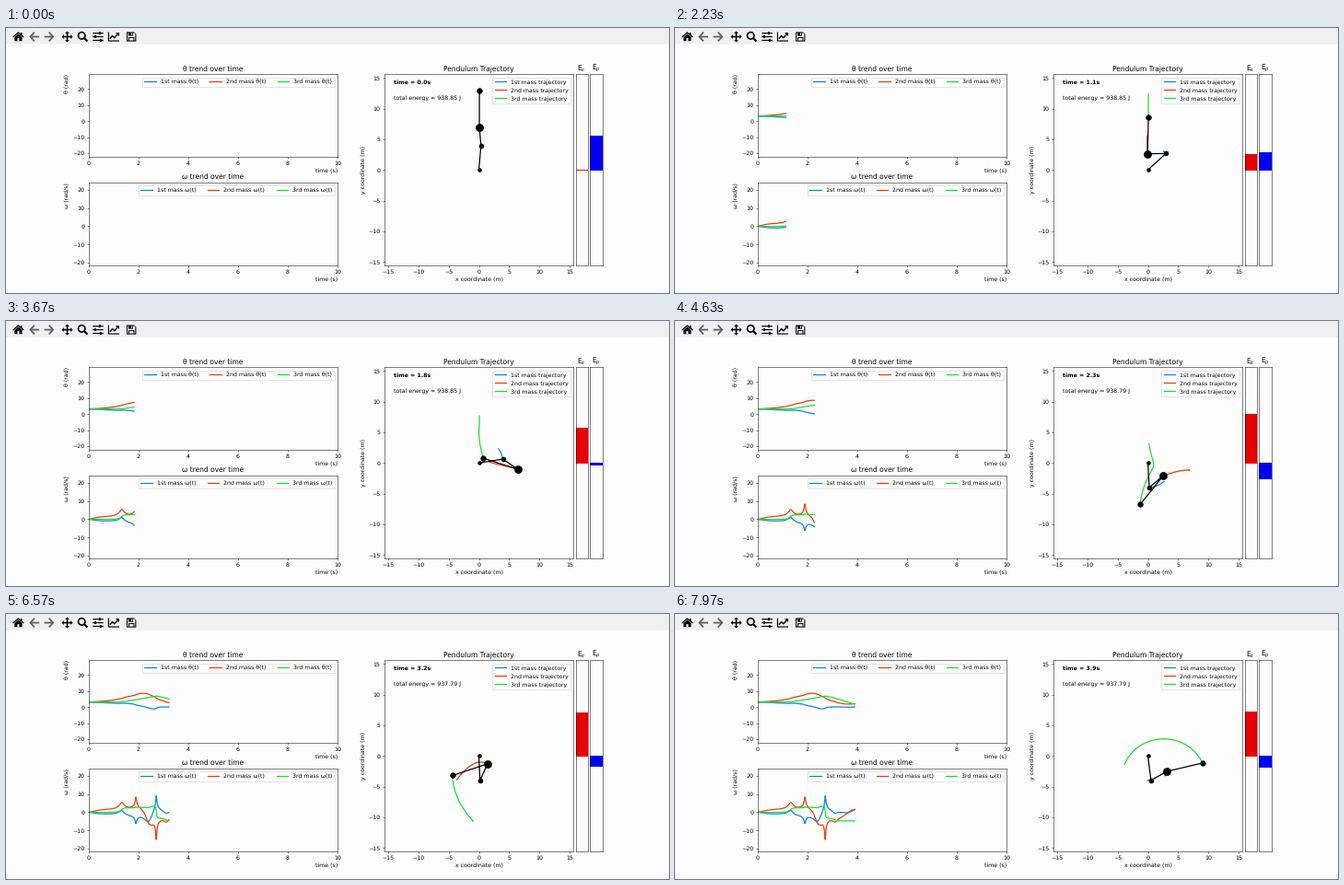
Recreate the animation shown at these times as a matplotlib script. Size 720 px wide and 288 px high, loop 8 s.

```python
import numpy as np
import matplotlib.pyplot as plt
from matplotlib.animation import FuncAnimation
from matplotlib.patches import Circle, Polygon, Rectangle

W, H, DPI = 720, 288, 45
FRAMES, LOOP = 240, 8000
DT, STEPS = 0.01, 400
LEAD, PACE = 5.4, 1.609          # simulation steps: head start, steps per frame
TRAILS = [20, 40, 60]
G = 9.81
MASS = np.array([2.0, 7.0, 3.0])
LEN = np.array([4.0, 3.0, 6.0])
START = np.radians([175, 185, 180])
COLORS = ["#0a84e8", "#f03a08", "#18e030"]
NAMES = ["1st mass", "2nd mass", "3rd mass"]
PAPER = "#fefdfe"

plt.rcParams["text.hinting"] = "none"

# --- triple pendulum -------------------------------------------------------
LOAD = MASS[::-1].cumsum()[::-1]
INERTIA = np.array([[LOAD[max(i, j)] * LEN[i] * LEN[j] for j in range(3)]
                    for i in range(3)])


def slope(state):
    th, om = state
    diff = th[:, None] - th[None, :]
    force = -(INERTIA * np.sin(diff)) @ om ** 2 - G * LOAD * LEN * np.sin(th)
    return np.array([om, np.linalg.solve(INERTIA * np.cos(diff), force)])


def rk4(state, h):
    a = slope(state)
    b = slope(state + h / 2 * a)
    c = slope(state + h / 2 * b)
    d = slope(state + h * c)
    return state + h / 6 * (a + 2 * b + 2 * c + d)


def simulate():
    states = [np.array([START, np.zeros(3)])]
    for _ in range(STEPS):
        states.append(rk4(states[-1], DT))
    states = np.array(states)
    return states[:, 0], states[:, 1]


time = np.arange(STEPS + 1) * DT
theta, omega = simulate()
xs = np.cumsum(LEN * np.sin(theta), axis=1)
ys = np.cumsum(-LEN * np.cos(theta), axis=1)
vx = np.cumsum(LEN * np.cos(theta) * omega, axis=1)
vy = np.cumsum(LEN * np.sin(theta) * omega, axis=1)
kinetic = 0.5 * (vx ** 2 + vy ** 2) @ MASS
potential = G * ys @ MASS

# --- layout ----------------------------------------------------------------
fig = plt.figure(figsize=(W / DPI, H / DPI), dpi=DPI, facecolor=PAPER)


def panel(left, top, right, bottom, title):
    ax = fig.add_axes([left / W, 1 - bottom / H, (right - left) / W, (bottom - top) / H],
                      facecolor=PAPER)
    ax.set_title(title)
    return ax


def trend(top, bottom, symbol, unit, ylim):
    ax = panel(90, top, 360, bottom, f"{symbol} trend over time")
    ax.set(xlim=(0, 10), ylim=ylim)
    ax.set_xlabel("time (s)", loc="right")
    ax.set_ylabel(f"{symbol} ({unit})", loc="top")
    lines = [ax.plot([], [], color=c, lw=2, label=f"{n} {symbol}(t)")[0]
             for c, n in zip(COLORS, NAMES)]
    ax.legend(loc="upper right", ncol=3)
    return lines


def gauge(left, right, name, color):
    ax = panel(left, 50.4, right, 258.3, f"E$_{name}$")
    ax.set(xlim=(0, 1), ylim=(-2620, 2620), xticks=[], yticks=[])
    return ax.add_patch(Rectangle((0, 0), 1, 0, fc=color, ec=color, lw=1.5))


theta_lines = trend(50.4, 139.9, "θ", "rad", (-22.3, 29.2))
omega_lines = trend(168.1, 258.3, "ω", "rad/s", (-21.7, 24))

space = panel(410.6, 50.4, 616.4, 258.3, "Pendulum Trajectory")
space.set(xlim=(-15.6, 15.6), ylim=(-15.6, 15.6),
          xticks=range(-15, 16, 5), yticks=range(-15, 16, 5))
space.set_xlabel("x coordinate (m)")
space.set_ylabel("y coordinate (m)")
trails = [space.plot([], [], color=c, lw=2, label=f"{n} trajectory")[0]
          for c, n in zip(COLORS, NAMES)]
rods, = space.plot([], [], color="black", lw=2)
space.plot(0, 0, "o", color="black", ms=6)
bobs = [space.plot([], [], "o", color="black", ms=6 + m)[0] for m in MASS]
space.legend(loc="upper right")
clock = space.text(0.05, 0.95, "", weight="bold", transform=space.transAxes)
total = space.text(0.05, 0.87, "", transform=space.transAxes)

kin_bar = gauge(618.7, 632, "k", "#e80000")
pot_bar = gauge(634.4, 648, "p", "#0000f0")


# --- window toolbar --------------------------------------------------------
def toolbar():
    ax = fig.add_axes([0, 0, 1, 1], zorder=5)
    ax.set(xlim=(0, W), ylim=(H, 0))
    ax.axis("off")
    ink, dim, bar = "#0a0a0a", "#606060", "#f0f0f0"

    def fill(points, color=ink):
        ax.add_patch(Polygon(points, fc=color, lw=0))

    def box(x, y, w, h, color=ink):
        ax.add_patch(Rectangle((x, y), w, h, fc=color, lw=0, snap=False))

    def stroke(points, color=ink, px=1.6):
        ax.plot(*zip(*points), color=color, lw=px * 72 / DPI, snap=False,
                solid_capstyle="butt", solid_joinstyle="miter")

    box(0, 0, W, 17.6, bar)
    # home
    stroke([(7.6, 9.9), (13.4, 4.9), (19.2, 9.9)], px=1.3)
    fill([(9.3, 9.8), (13.4, 6.4), (17.5, 9.8), (17.5, 14.2), (9.3, 14.2)])
    box(16, 4.9, 1.5, 3)
    box(12.4, 11, 2, 3.2, bar)
    # back and forward
    for x, s in ((25.3, 1), (52.3, -1)):
        stroke([(x + 5.6 * s, 4.6), (x + 1.2 * s, 9.5), (x + 5.6 * s, 14.4)], dim, 1.8)
        stroke([(x + 1.2 * s, 9.5), (x + 10.7 * s, 9.5)], dim, 1.8)
    # pan
    cx, cy = 66.5, 9.5
    stroke([(cx - 5, cy), (cx + 5, cy)])
    stroke([(cx, cy - 5), (cx, cy + 5)])
    for dx, dy in ((1, 0), (-1, 0), (0, 1), (0, -1)):
        fill([(cx + 6 * dx, cy + 6 * dy),
              (cx + 3.6 * dx + 2.4 * dy, cy + 3.6 * dy + 2.4 * dx),
              (cx + 3.6 * dx - 2.4 * dy, cy + 3.6 * dy - 2.4 * dx)])
    # zoom
    ax.add_patch(Circle((82.2, 8.3), 3.7, fc="none", ec=ink, lw=1.7 * 72 / DPI))
    stroke([(84.8, 10.9), (88.4, 14.5)], px=2.2)
    # sliders
    for y, knob in ((5.6, 101.8), (9.5, 97), (13.4, 102.8)):
        stroke([(94.2, y), (105.8, y)], px=1.2)
        box(knob - 1, y - 1.5, 2, 3)
    # chart
    stroke([(111.4, 4.5), (111.4, 14), (123, 14)], px=1.2)
    stroke([(112.8, 11.6), (115.6, 8.6), (117.8, 10.6), (121.4, 6.6)], px=1.5)
    fill([(119.2, 5.2), (122.8, 5.2), (122.8, 8.8)])
    # save
    fill([(131, 4.4), (139.2, 4.4), (141.4, 6.6), (141.4, 14.6), (131, 14.6)])
    box(132.1, 5.5, 8.2, 8, bar)
    box(133, 5, 5, 3.6)
    box(136, 5.5, 1.1, 2.2, bar)
    box(133, 10, 6.4, 4)
    box(134, 11, 4.4, 2.5, bar)


toolbar()


def draw(k):
    n = round(LEAD + PACE * k) if k else 0
    end = n + 1 if n else 0
    for i in range(3):
        recent = slice(max(0, n - TRAILS[i]), end)
        theta_lines[i].set_data(time[:end], theta[:end, i])
        omega_lines[i].set_data(time[:end], omega[:end, i])
        trails[i].set_data(xs[recent, i], ys[recent, i])
        bobs[i].set_data([xs[n, i]], [ys[n, i]])
    rods.set_data([0, *xs[n]], [0, *ys[n]])
    kin_bar.set_height(kinetic[n])
    pot_bar.set_height(potential[n])
    clock.set_text(f"time = {time[n]:.1f}s")
    total.set_text(f"total energy = {kinetic[n] + potential[n]:.2f} J")


anim = FuncAnimation(fig, draw, frames=FRAMES, interval=LOOP / FRAMES,
                     repeat=True, repeat_delay=0, cache_frame_data=False)
plt.show()
```
